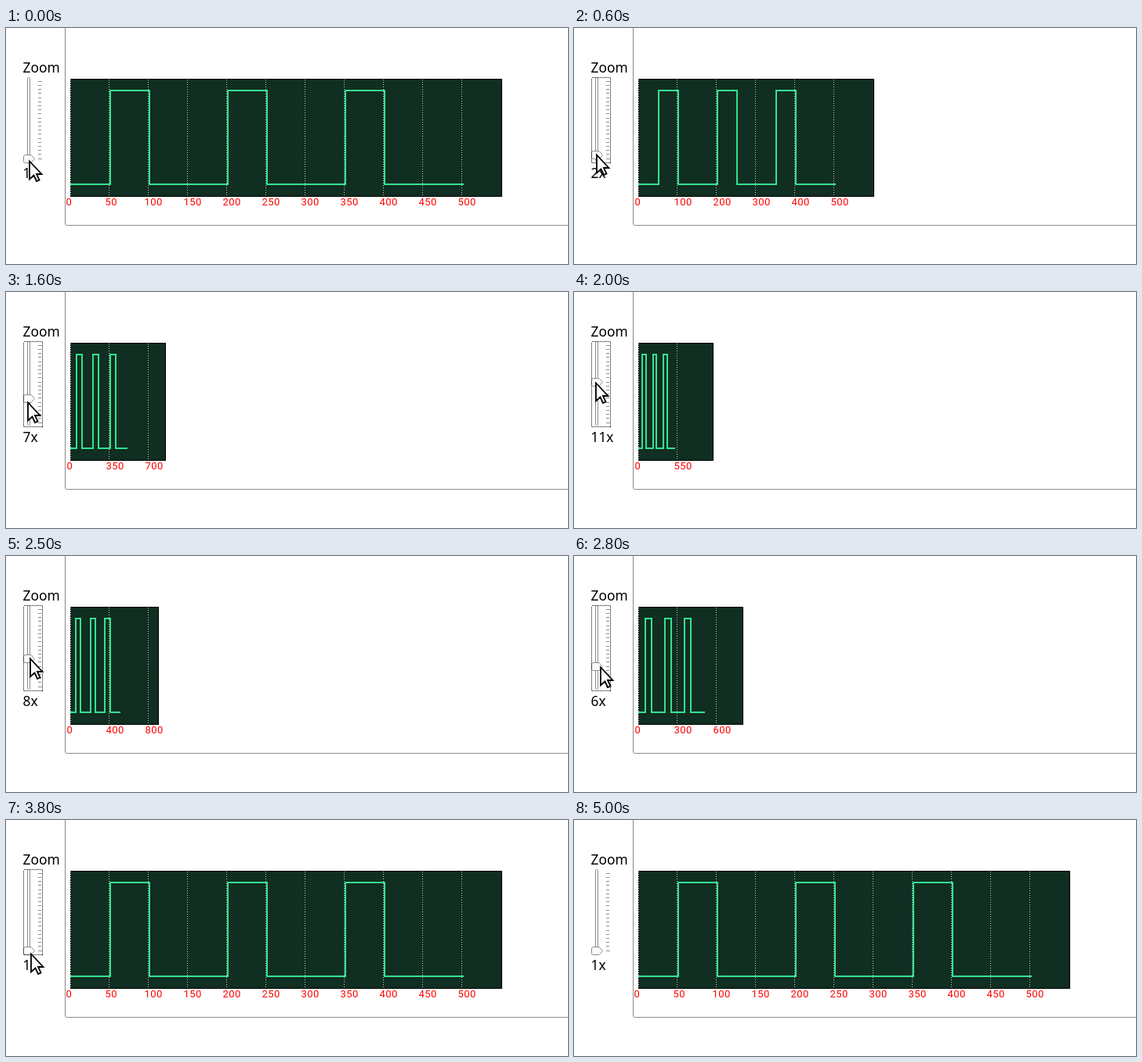
An HTML page that plays this animation: 717 by 302 pixels, repeating every 5.2 s.

```html
<!DOCTYPE html>
<html lang="en">
<head>
<meta charset="utf-8">
<title>Zoom slider</title>
<style>
  html, body { margin: 0; width: 100%; height: 100%; overflow: hidden; background: #fff; }
  svg { display: block; }
  text { font: 17.33px "Noto Sans", "Open Sans", sans-serif; }
  .axis { font: 13px Roboto, Arial, sans-serif; letter-spacing: .5px; fill: #f00; }
  .crisp { shape-rendering: crispEdges; }
</style>
</head>
<body>
<svg width="717" height="302" viewBox="0 0 717 302">
  <path d="M75.5 -1V250.5Q75.5 252.5 77.5 252.5H718" fill="none" stroke="#8c8c8c"/>
  <text x="21.5" y="57">Zoom</text>
  <text id="factor" x="21.5" y="192"></text>
  <g id="chart"></g>
  <rect x="27.5" y="63.5" width="3" height="107" rx="1" fill="#fff" stroke="#8c8c8c"/>
  <path id="ticks" class="crisp" stroke="#8c8c8c"/>
  <path id="handle" d="M24.5 -5H32L36.5 0L32 5H24.5Q22.5 5 22.5 3V-3Q22.5 -5 24.5 -5Z" fill="#fcfcfc" stroke="#8c8c8c"/>
  <rect id="focus" class="crisp" x="22.5" y="63.5" width="24" height="109" fill="none" stroke="#000" stroke-dasharray="1 1"/>
  <path id="cursor" d="M0 0V23L5.5 18L9 25.5L12.5 24L9 16.5H15.5Z" fill="#fff" stroke="#000" stroke-width="1.8"/>
</svg>
<script>
const LOOP = 5200, STEP = 100, TICK = 5.2, BOTTOM = 167;
const $ = id => document.getElementById(id);

// Pointer path: time, x, y
const path = [
  [0, 30, 170], [200, 30, 170], [300, 30, 169], [700, 29, 160], [800, 29, 160],
  [900, 28, 159], [1100, 28, 155], [1400, 28, 150], [1500, 28, 147], [2000, 28, 116],
  [2100, 28, 116], [2700, 33, 139], [2800, 34, 142], [3200, 33, 159], [3300, 33, 159],
  [3500, 31, 161], [3600, 31, 165], [3800, 32, 171], [3900, 32, 174], [4000, 35, 177],
  [4200, 35, 177], [4300, 36, 172], [4400, 62, 150], [4500, 120, 108],
  [4600, 212, 56], [4700, 314, 3], [LOOP, 314, 3]
];

function pointer(t) {
  const i = path.findIndex(p => p[0] > t);
  const [t0, x0, y0] = path[i - 1], [t1, x1, y1] = path[i];
  const k = (t - t0) / (t1 - t0);
  return [x0 + (x1 - x0) * k, y0 + (y1 - y0) * k];
}

function drawChart(zoom) {
  const width = 50 + 500 / zoom;
  const right = 82 + Math.floor(width);
  let grid = '', labels = '';
  for (let k = 0; k * 50 < width; k++) {
    grid += `M${k ? 81.5 + 50 * k : 82.5} 66V215`;
    labels += `<text class="axis" x="${(zoom === 1 ? 76.5 : 77.5) + 50 * k}" y="227">${k * 50 * zoom}</text>`;
  }
  const at = v => 83 + Math.floor(v / zoom);
  const pulses = [50, 200, 350].map(v => `H${at(v)}V80H${at(v + 50)}V200`).join('');
  $('chart').innerHTML = `<g class="crisp" fill="none">
    <rect x="82.5" y="65.5" width="${right - 82}" height="149.5" fill="#102e21" stroke="#000"/>
    <path d="${grid}" stroke="#c4ccc8" stroke-dasharray="1 2"/>
    <path d="M83 200${pulses}H${at(500)}" stroke="#35e192" stroke-width="2" stroke-linecap="square"/>
  </g>${labels}`;
}

let ticks = '';
for (let i = 0; i < 20; i++)
  ticks += `M41 ${Math.floor(BOTTOM - i * TICK) + .5}H${i % 19 ? 45 : 46}`;
$('ticks').setAttribute('d', ticks);

let shown = 0;
function frame(now) {
  const t = Math.floor(now % LOOP / STEP) * STEP;
  const [x, y] = pointer(t);
  const dragging = t >= 300 && t < 3900;
  const zoom = dragging ? Math.max(1, Math.round(1 + (170 - y) / TICK)) : 1;
  if (zoom !== shown) {
    drawChart(shown = zoom);
    $('factor').textContent = zoom + 'x';
    $('handle').setAttribute('transform', `translate(0 ${Math.round(BOTTOM - (zoom - 1) * TICK) + .5})`);
  }
  $('focus').style.display = t >= 300 && t < 5000 ? '' : 'none';
  $('cursor').style.display = t < 4800 ? '' : 'none';
  $('cursor').setAttribute('transform', `translate(${Math.round(x)} ${Math.round(y) + .5})`);
  requestAnimationFrame(frame);
}
frame(0);
</script>
</body>
</html>
```
